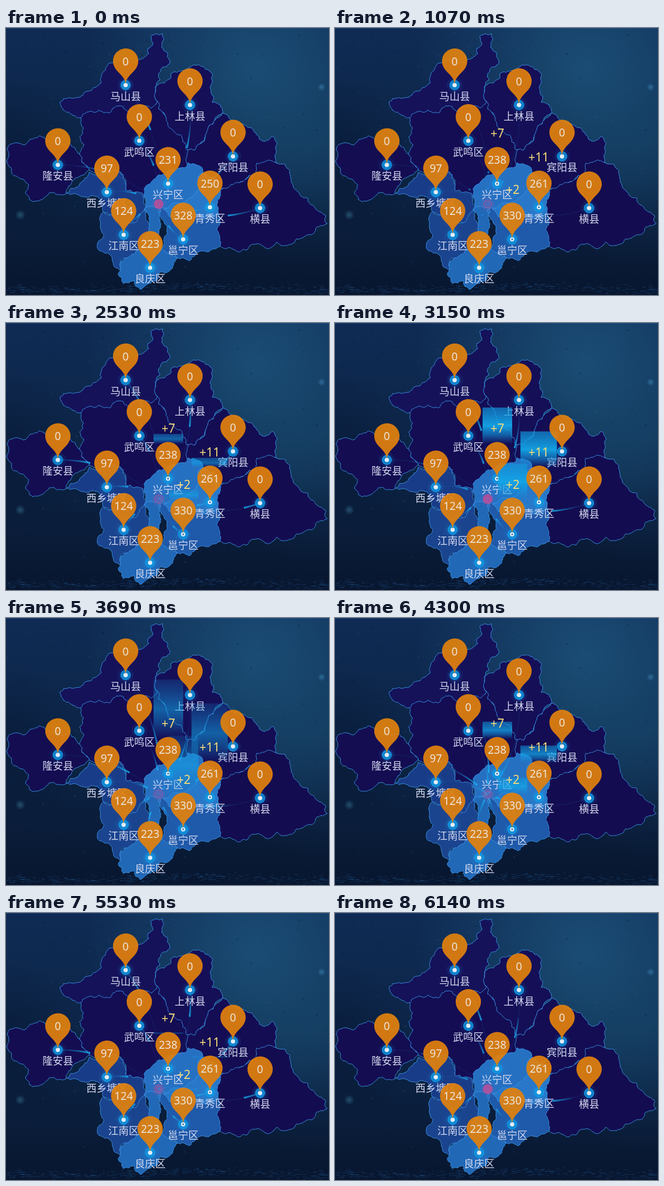
Write an HTML page with a canvas that moves like this. It is 567 by 470 pixels and loops after 6.22 s.

```html
<!DOCTYPE html>
<html lang="zh">
<head>
<meta charset="utf-8">
<title>District map</title>
<style>
html, body { margin: 0; width: 100%; height: 100%; overflow: hidden; background: #0b1f40; }
canvas { display: block; }
</style>
</head>
<body>
<canvas id="stage" width="567" height="470"></canvas>
<script>
const W = 567, H = 470, LOOP = 6220, TAU = Math.PI * 2;
const FLIGHT = 3000, FLIGHT_START = 1790, TAIL = 0.38;
const UPDATE = 1070, CLEAR = 5570;
const RISE = 1600, RISE_START = 695;
const HUB = { x: 268, y: 310 };
const SANS = '"Noto Sans", "Open Sans", sans-serif';
const HAN = '"Noto Sans CJK SC", "Noto Sans CJK", "Noto Sans", sans-serif';
const ctx = document.getElementById('stage').getContext('2d');

// name, x, y, value, gain, head lead in pixels
const places = [
  ['马山县', 210, 100.5, 0, 0, 0],
  ['上林县', 323, 135.5, 0, 0, 0],
  ['武鸣区', 234, 198.5, 0, 0, 2],
  ['隆安县', 91, 241, 0, 0, 8],
  ['宾阳县', 398.5, 226, 0, 0, -10],
  ['兴宁区', 284.5, 274, 231, 7, 4],
  ['西乡塘区', 177, 289, 97, 0, 13],
  ['青秀区', 358, 315.5, 250, 11, 0],
  ['横县', 446, 317, 0, 0, -16],
  ['江南区', 206.5, 364, 124, 0, 13],
  ['邕宁区', 311, 372, 328, 2, 4],
  ['良庆区', 253, 422, 223, 0, 8]
].map(([name, x, y, value, gain, lead]) => {
  const dx = HUB.x - x, dy = HUB.y - y;
  return {
    name, x, y, value, gain,
    lead: lead / Math.hypot(dx, dy),
    cx: (x + HUB.x) / 2 + dy * 0.2,
    cy: (y + HUB.y) / 2 - dx * 0.2
  };
});

// text centre, column width
const gains = [
  { text: '+7', x: 285, y: 186, w: 52 },
  { text: '+11', x: 357.5, y: 228, w: 64 },
  { text: '+2', x: 312, y: 285, w: 51 }
];

// painted in order, later areas cover the seams of earlier ones
const areas = [
  ['#140c50', [372,285, 410,272, 428,258, 440,236, 475,238, 490,240, 500,265, 512,288, 530,300, 545,320, 560,329, 564,344, 546,350, 535,364, 510,371, 500,381, 476,377, 460,389, 440,380, 424,390, 400,390, 376,384, 350,360, 350,310]],
  ['#140d54', [130,157, 140,148, 165,140, 200,120, 265,115, 290,165, 325,212, 330,245, 290,262, 258,280, 240,300, 210,290, 206,262, 188,250, 168,256, 150,252, 133,236, 129,222, 137,205, 129,192, 136,176]],
  ['#15125a', [95,130, 110,123, 130,122, 150,110, 167,97, 170,78, 181,62, 196,57, 215,62, 235,55, 251,45, 249,36, 258,27, 254,15, 262,10, 275,10, 277,20, 273,34, 283,43, 287,57, 282,68, 268,80, 270,92, 262,104, 262,118, 266,130, 255,141, 235,138, 214,147, 194,137, 184,148, 163,144, 142,148, 130,158, 117,154, 101,145]],
  ['#150f57', [263,103, 278,97, 290,80, 305,76, 322,70, 346,68, 357,75, 362,92, 358,106, 365,120, 362,131, 376,135, 381,149, 366,162, 356,172, 350,190, 341,204, 331,215, 317,214, 310,200, 306,188, 293,180, 284,169, 280,156, 268,143, 266,129, 261,116]],
  ['#140d54', [319,214, 331,215, 341,204, 350,190, 356,172, 368,161, 380,150, 396,162, 421,172, 438,184, 450,199, 468,191, 476,205, 472,224, 475,238, 457,234, 440,238, 440,256, 427,259, 410,272, 372,287, 340,270, 318,240]],
  ['#140d52', [2,214, 10,204, 31,206, 42,196, 58,190, 75,199, 92,207, 112,203, 129,222, 133,236, 146,250, 126,263, 110,278, 105,292, 76,290, 66,300, 41,302, 34,291, 40,276, 30,266, 16,260, 9,246, 1,234, 5,223]],
  ['#193c88', [106,291, 125,280, 146,254, 168,258, 189,249, 206,258, 211,286, 240,291, 250,320, 235,350, 195,345, 170,322, 166,303, 150,295, 130,296]],
  ['#1b448f', [166,346, 171,323, 186,329, 205,346, 228,342, 243,318, 255,350, 245,385, 225,400, 206,405, 201,426, 187,411, 181,398, 164,392, 162,376, 172,364]],
  ['#2670c2', [243,291, 258,268, 275,258, 290,250, 314,246, 320,237, 340,243, 347,256, 340,275, 345,305, 310,325, 275,325, 244,320]],
  ['#1f59a9', [271,318, 300,325, 372,322, 370,354, 375,385, 356,394, 333,398, 321,410, 300,405, 270,392]],
  ['#2168b7', [243,320, 270,316, 272,345, 274,389, 288,396, 301,405, 291,424, 270,430, 265,444, 250,450, 235,460, 225,445, 206,450, 197,432, 208,406, 228,393, 241,371]],
  ['#2877c8', [337,262, 347,255, 365,262, 373,277, 375,300, 372,322, 364,336, 346,336, 330,329, 300,342, 276,319, 298,308, 320,301, 334,289]]
];

function rng(seed) {
  return () => {
    seed = (seed * 16807) % 2147483647;
    return seed / 2147483647;
  };
}

function jag(path, x0, y0, x1, y1, rand) {
  const dx = x1 - x0, dy = y1 - y0;
  if (Math.hypot(dx, dy) < 4) return path.lineTo(x1, y1);
  const k = (rand() - 0.5) * 0.38;
  const mx = (x0 + x1) / 2 - dy * k, my = (y0 + y1) / 2 + dx * k;
  jag(path, x0, y0, mx, my, rand);
  jag(path, mx, my, x1, y1, rand);
}

function outline(pts, rand) {
  const path = new Path2D();
  path.moveTo(pts[0], pts[1]);
  for (let i = 0; i < pts.length; i += 2) {
    const j = (i + 2) % pts.length;
    jag(path, pts[i], pts[i + 1], pts[j], pts[j + 1], rand);
  }
  path.closePath();
  return path;
}

function glow(c, x, y, r, rgb, a) {
  const g = c.createRadialGradient(x, y, 0, x, y, r);
  g.addColorStop(0, `rgba(${rgb},${a})`);
  g.addColorStop(1, `rgba(${rgb},0)`);
  c.fillStyle = g;
  c.fillRect(0, 0, W, H);
}

function paintBackdrop() {
  const cv = document.createElement('canvas');
  cv.width = W;
  cv.height = H;
  const c = cv.getContext('2d'), rand = rng(4127);
  const sky = c.createLinearGradient(0, 0, 0, H);
  sky.addColorStop(0, '#0f2b54');
  sky.addColorStop(0.55, '#0c2445');
  sky.addColorStop(1, '#08162f');
  c.fillStyle = sky;
  c.fillRect(0, 0, W, H);
  glow(c, 440, 70, 300, '34,98,138', 0.62);
  glow(c, 550, 200, 220, '26,80,118', 0.35);
  glow(c, 0, 230, 150, '4,16,40', 0.4);
  glow(c, 25, 329, 9, '60,130,160', 0.5);
  glow(c, 554, 104, 7, '70,150,200', 0.5);
  for (let i = 0; i < 260; i++) {
    c.fillStyle = rand() < 0.5 ? 'rgba(70,140,185,.16)' : 'rgba(3,14,36,.3)';
    const s = 0.8 + rand() * 1.8;
    c.fillRect(rand() * W, rand() * H, s, s);
  }
  for (let i = 0; i < 420; i++) {
    const x = rand() * W, spread = rand() + rand() - 1;
    const y = 458 + Math.sin(x / 70) * 3 + spread * 10;
    c.fillStyle = `rgba(45,115,180,${0.1 + rand() * 0.25})`;
    c.fillRect(x, y, 2 + rand() * 7, 0.9);
  }
  c.fillStyle = 'rgba(40,90,160,.5)';
  c.fillRect(0, 0, W, 1);

  c.lineJoin = 'round';
  areas.forEach(([fill, pts], i) => {
    const path = outline(pts, rng(311 + i * 977));
    c.fillStyle = fill;
    c.fill(path);
    c.strokeStyle = '#3a96e6';
    c.lineWidth = 0.9;
    c.stroke(path);
  });
  return cv;
}

function pinPath(x, y, size) {
  const r = size * 0.3, dy = r * r / (size - r), cy = y - size + r + dy;
  const a = Math.asin(dy / r), dx = Math.cos(a) * r;
  const tx = Math.sin(a) * r * 0.6, ty = Math.cos(a) * r * 0.6, tip = y - r * 0.7;
  const p = new Path2D();
  p.arc(x, cy, r, Math.PI - a, TAU + a);
  p.bezierCurveTo(x + dx - tx, cy + dy + ty, x, tip, x, y);
  p.bezierCurveTo(x, tip, x - dx + tx, cy + dy + ty, x - dx, cy + dy);
  return p;
}

const backdrop = paintBackdrop();
places.forEach(p => { p.pin = pinPath(p.x, p.y, 74); });

const mod = (a, n) => ((a % n) + n) % n;

function disc(x, y, r, fill) {
  ctx.fillStyle = fill;
  ctx.beginPath();
  ctx.arc(x, y, r, 0, TAU);
  ctx.fill();
}

function ring(x, y, r, color, w) {
  ctx.strokeStyle = color;
  ctx.lineWidth = w;
  ctx.beginPath();
  ctx.arc(x, y, r, 0, TAU);
  ctx.stroke();
}

function label(text, x, y, font, color) {
  ctx.font = font;
  ctx.fillStyle = color;
  ctx.fillText(text, x, y);
}

function along(p, s) {
  const u = 1 - s;
  return [
    u * u * p.x + 2 * u * s * p.cx + s * s * HUB.x,
    u * u * p.y + 2 * u * s * p.cy + s * s * HUB.y
  ];
}

function drawTrail(p, head, reach) {
  const n = 24, len = Math.min(TAIL, reach);
  for (let i = 0; i < n; i++) {
    const a = head - len * (1 - i / n), b = a + len / n;
    if (b <= 0 || a >= 1) continue;
    const fade = 1 - (head - b) / TAIL;
    ctx.strokeStyle = `rgba(24,176,240,${0.85 * fade * fade})`;
    ctx.lineWidth = 1.6 + 1.5 * fade;
    ctx.beginPath();
    ctx.moveTo(...along(p, Math.max(0, a)));
    ctx.lineTo(...along(p, Math.min(1, b)));
    ctx.stroke();
  }
}

function drawFlights(t) {
  const phase = mod(t - FLIGHT_START, FLIGHT) / FLIGHT;
  const since = t >= CLEAR ? t - CLEAR : t >= UPDATE ? t - UPDATE : Infinity;
  const reach = Math.max(0.015, since / FLIGHT);
  for (const p of places) {
    ctx.strokeStyle = 'rgba(40,140,210,.08)';
    ctx.lineWidth = 2;
    ctx.beginPath();
    ctx.moveTo(p.x, p.y);
    ctx.quadraticCurveTo(p.cx, p.cy, HUB.x, HUB.y);
    ctx.stroke();
    const head = Math.max(0.02, phase + p.lead);
    drawTrail(p, head, reach);
    drawTrail(p, head + 1, reach);
  }
}

function drawHub(t) {
  const phase = mod(t - FLIGHT_START, FLIGHT) / FLIGHT;
  const solid = Math.max(0, 1 - Math.abs(phase - 0.43) / 0.2);
  disc(HUB.x, HUB.y, 8.5, `rgba(205,75,150,${0.25 + 0.55 * solid})`);
  for (let i = 0; i < 3; i++) {
    const k = mod(t / 4000 + i / 3, 1);
    ring(HUB.x, HUB.y, 4 + k * 11, `rgba(225,60,130,${0.7 * (1 - k)})`, 1);
  }
}

function drawSpot(p, t, hollow) {
  disc(p.x, p.y, 9, 'rgba(14,150,226,.85)');
  for (let i = 0; i < 3; i++) {
    const k = mod(t / 4000 + i / 3, 1);
    ring(p.x, p.y, 7 + k * 9, `rgba(30,165,235,${0.65 * (1 - k)})`, 1);
  }
  disc(p.x, p.y, 3.8, '#e2eefa');
  if (hollow) disc(p.x, p.y, 1.5, '#2b6fae');
}

function drawColumn(g, t) {
  const age = mod(t - RISE_START, RISE);
  const h = age * 0.075;
  if (h < 1) return;
  const alpha = Math.min(1, 0.35 + age / 900, (RISE - age) / 350)
    * Math.min(1, (t - UPDATE) / 300);
  const bottom = g.y + 27, top = bottom - h;
  const fill = ctx.createLinearGradient(0, top, 0, bottom);
  fill.addColorStop(0, `rgba(18,150,220,${h > 70 ? 0.3 : 0.65})`);
  fill.addColorStop(0.5, 'rgba(18,166,232,.95)');
  fill.addColorStop(0.75, 'rgba(18,150,222,.6)');
  fill.addColorStop(1, 'rgba(18,140,215,0)');
  ctx.globalAlpha = Math.max(0, alpha);
  ctx.fillStyle = fill;
  ctx.fillRect(g.x - g.w / 2, top, g.w, h);
  ctx.globalAlpha = 1;
}

function draw(t) {
  const updated = t >= UPDATE, showGain = updated && t < CLEAR;
  ctx.drawImage(backdrop, 0, 0);
  ctx.textAlign = 'center';
  ctx.textBaseline = 'middle';
  drawFlights(t);
  drawHub(t);
  for (const p of places) drawSpot(p, t, showGain && p.gain);
  for (const p of places) label(p.name, p.x, p.y + 19.5, '18px ' + HAN, '#d5daf0');
  if (showGain) gains.forEach(g => drawColumn(g, t));
  for (const p of places) {
    ctx.fillStyle = 'rgba(226,130,14,.92)';
    ctx.fill(p.pin);
    label(p.value + (updated ? p.gain : 0), p.x, p.y - 40, '19px ' + SANS, '#ece6dc');
  }
  if (showGain) gains.forEach(g => label(g.text, g.x, g.y + 1, '21px ' + SANS, '#f7dc78'));
}

const start = performance.now();
function frame() {
  draw((performance.now() - start) % LOOP);
  requestAnimationFrame(frame);
}
frame();
</script>
</body>
</html>
```
